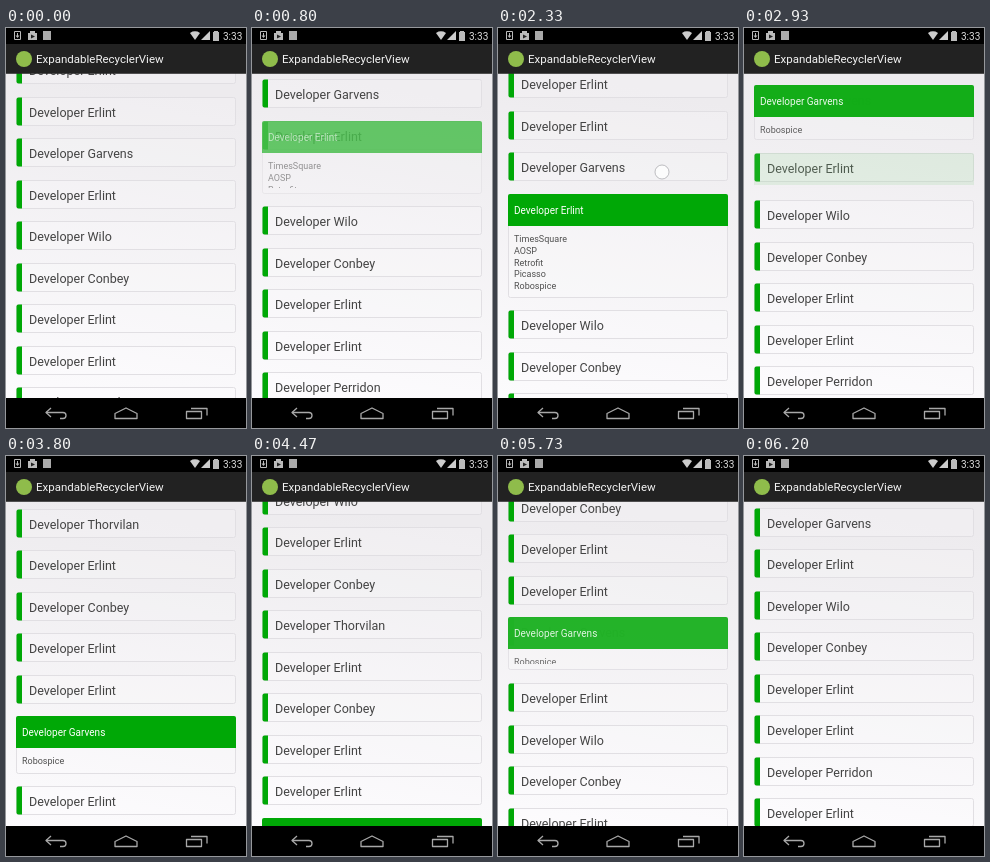
An HTML page with a canvas that plays this animation: 240x400 px, repeating every 6270 ms.

```html
<!DOCTYPE html>
<html lang="en">
<head>
<meta charset="utf-8">
<title>ExpandableRecyclerView</title>
<style>
html, body { margin: 0; width: 100%; height: 100%; overflow: hidden; background: #000; }
canvas { display: block; width: 240px; height: 400px; }
</style>
</head>
<body>
<canvas id="stage" width="240" height="400"></canvas>
<script>
const ctx = document.getElementById('stage').getContext('2d');
const LOOP = 6270, GREEN = '#00a806';
const CARD = 29, GAP = 12.5, HEADER = 32;

const names = ['Erlint', 'Wilo', 'Erlint', 'Conbey', 'Thorvilan', 'Erlint', 'Conbey', 'Erlint',
  'Erlint', 'Garvens', 'Erlint', 'Wilo', 'Conbey', 'Erlint', 'Erlint', 'Perridon', 'Erlint',
  'Erlint', 'Conbey', 'Erlint'];
const ANCHOR = 9;
const details = {
  9: { height: 57.5, lines: ['Robospice'] },
  10: { height: 104, lines: ['TimesSquare', 'AOSP', 'Retrofit', 'Picasso', 'Robospice'] }
};

const part = (t, a, b) => Math.min(1, Math.max(0, (t - a) / (b - a)));
const ease = (t, a, b) => (1 - Math.cos(Math.PI * part(t, a, b))) / 2;
const easeOut = (t, a, b) => 1 - (1 - part(t, a, b)) ** 3;

// Top of the anchor card: taps and drags added together
const anchorTop = t => 110.6
  - 100.1 * ease(t, 467, 1067)
  + 114 * ease(t, 1330, 1870)
  - 72.5 * ease(t, 2440, 3040)
  + 312 * easeOut(t, 3400, 4700)
  - 183 * ease(t, 4700, 5330)
  - 129 * ease(t, 5580, 6180);

function openness(i, t) {
  const second = ease(t, 2440, 3040);
  if (i === 10) return ease(t, 467, 1067) - second;
  if (i === 9) return second - ease(t, 5580, 6180);
  return 0;
}

// y is the middle of the capital letters
function text(s, x, y, size, color) {
  ctx.font = size + 'px Roboto, sans-serif';
  ctx.fillStyle = color;
  ctx.fillText(s, x, y + size * 0.36);
}

function rect(x, y, w, h, color) {
  ctx.fillStyle = color;
  ctx.fillRect(x, y, w, h);
}

function round(x, y, w, h, r) {
  ctx.beginPath();
  ctx.roundRect(x, y, w, h, r);
}

function path(points, color, fill) {
  ctx.beginPath();
  points.forEach(([x, y]) => ctx.lineTo(x, y));
  ctx.fillStyle = ctx.strokeStyle = color;
  fill ? ctx.fill() : ctx.stroke();
}

function frame(y, h) {
  round(10.5, y + 0.5, 219, h - 1, 2);
  ctx.fillStyle = 'rgba(255,255,255,.15)';
  ctx.fill();
  ctx.strokeStyle = '#e1dfe3';
  ctx.stroke();
}

function drawCard(label, y, h, open, lines) {
  ctx.save();
  ctx.lineWidth = 1;
  if (open < 1) {
    ctx.globalAlpha = 1 - open;
    frame(y, CARD);
    round(10.5, y + 0.5, 5.5, CARD - 1, [2, 0, 0, 2]);
    ctx.fillStyle = GREEN;
    ctx.fill();
    text(label, 23, y + 15, 12.5, '#444');
  }
  if (open > 0) {
    ctx.globalAlpha = open;
    frame(y, h);
    round(10, y, 220, Math.min(HEADER, h), [2, 2, 0, 0]);
    ctx.fillStyle = GREEN;
    ctx.fill();
    text(label, 16, y + 16.5, 10, '#fff');
    ctx.beginPath();
    ctx.rect(10, y + HEADER, 220, Math.max(0, h - HEADER - 6));
    ctx.clip();
    lines.forEach((s, i) => text(s, 16, y + 45 + i * 11.7, 9, '#505050'));
  }
  ctx.restore();
}

function drawList(t) {
  const shade = ctx.createLinearGradient(60, 45, 0, 370);
  shade.addColorStop(0, '#edebee');
  shade.addColorStop(1, '#fcfbfd');
  rect(0, 45, 240, 325, shade);
  let y = anchorTop(t) - ANCHOR * (CARD + GAP);
  names.forEach((name, i) => {
    const open = openness(i, t), item = details[i];
    const h = item ? CARD + (item.height - CARD) * open : CARD;
    // Cards sit on whole pixels
    const top = Math.floor(y + 0.01);
    if (y + h > 40 && y < 375) {
      drawCard('Developer ' + name, top, Math.round(h), open, item && item.lines);
    }
    y += h + GAP;
  });
}

function touch(x, y) {
  ctx.beginPath();
  ctx.arc(x, y, 7, 0, 7);
  ctx.fillStyle = 'rgba(255,255,255,.75)';
  ctx.fill();
  ctx.lineWidth = 1;
  ctx.strokeStyle = 'rgba(150,150,155,.6)';
  ctx.stroke();
}

function drawTouch(t) {
  const during = (a, b) => t >= a && t < b;
  const top = anchorTop(t);
  if (during(1330, 1700)) touch(164, 120 + top);
  if (during(2330, 2440)) touch(164, 144);
  if (during(3400, 3600)) touch(164, 68 + top);
  if (during(4730, 5250)) touch(165, top - 86);
  if (during(5470, 5580)) touch(164, 198);
}

function drawBars() {
  rect(0, 0, 240, 16, '#000');
  rect(0, 16, 240, 29, '#222');
  rect(0, 45, 240, 1, 'rgba(40,40,40,.8)');
  rect(0, 370, 240, 30, '#000');

  ctx.beginPath();
  ctx.arc(18, 31, 8, 0, 7);
  ctx.fillStyle = '#8fbc4b';
  ctx.fill();
  text('ExpandableRecyclerView', 30, 31, 11.5, '#f3f3f3');

  // Notifications
  ctx.lineWidth = 1;
  ctx.strokeStyle = '#bbb';
  ctx.strokeRect(8.5, 3.5, 6, 8);
  rect(11, 5, 1, 3, '#bbb');
  path([[9.5, 7.5], [13.5, 7.5], [11.5, 10]], '#bbb', true);
  rect(22, 5, 9, 7, '#bbb');
  rect(24, 3, 5, 2, '#bbb');
  path([[25, 6.5], [29, 8.5], [25, 10.5]], '#222', true);
  rect(37, 3, 8, 9, '#aaa');

  // Wi-Fi, signal, battery, clock
  path([[184, 5], [186.5, 3.6], [189, 3.2], [191.5, 3.6], [194, 5], [189, 12]], '#ccc', true);
  path([[204, 3], [204, 12], [195, 12]], '#ccc', true);
  rect(207, 4, 6, 9, '#bbb');
  rect(208, 3, 4, 1, '#bbb');
  text('3:33', 217, 8, 10, '#ddd');

  // Navigation keys
  const key = '#a8a8a8';
  ctx.lineWidth = 1.3;
  ctx.lineJoin = 'round';
  path([[45, 380], [40, 384.5], [45, 389]], key);
  ctx.beginPath();
  ctx.moveTo(40, 384.5);
  ctx.lineTo(57, 384.5);
  ctx.arc(57, 387.5, 3, -Math.PI / 2, Math.PI / 2);
  ctx.lineTo(54, 390.5);
  ctx.stroke();
  path([[109, 385.5], [109, 390.5], [131, 390.5], [131, 385.5], [120, 380], [109, 385.5],
    [109, 390.5]], key);
  ctx.strokeRect(180.5, 383.5, 15, 7);
  path([[185, 380.5], [201, 380.5], [201, 387.5]], key);
}

function draw(now) {
  const t = now % LOOP;
  drawList(t);
  drawTouch(t);
  drawBars();
  requestAnimationFrame(draw);
}
draw(0);
</script>
</body>
</html>
```
